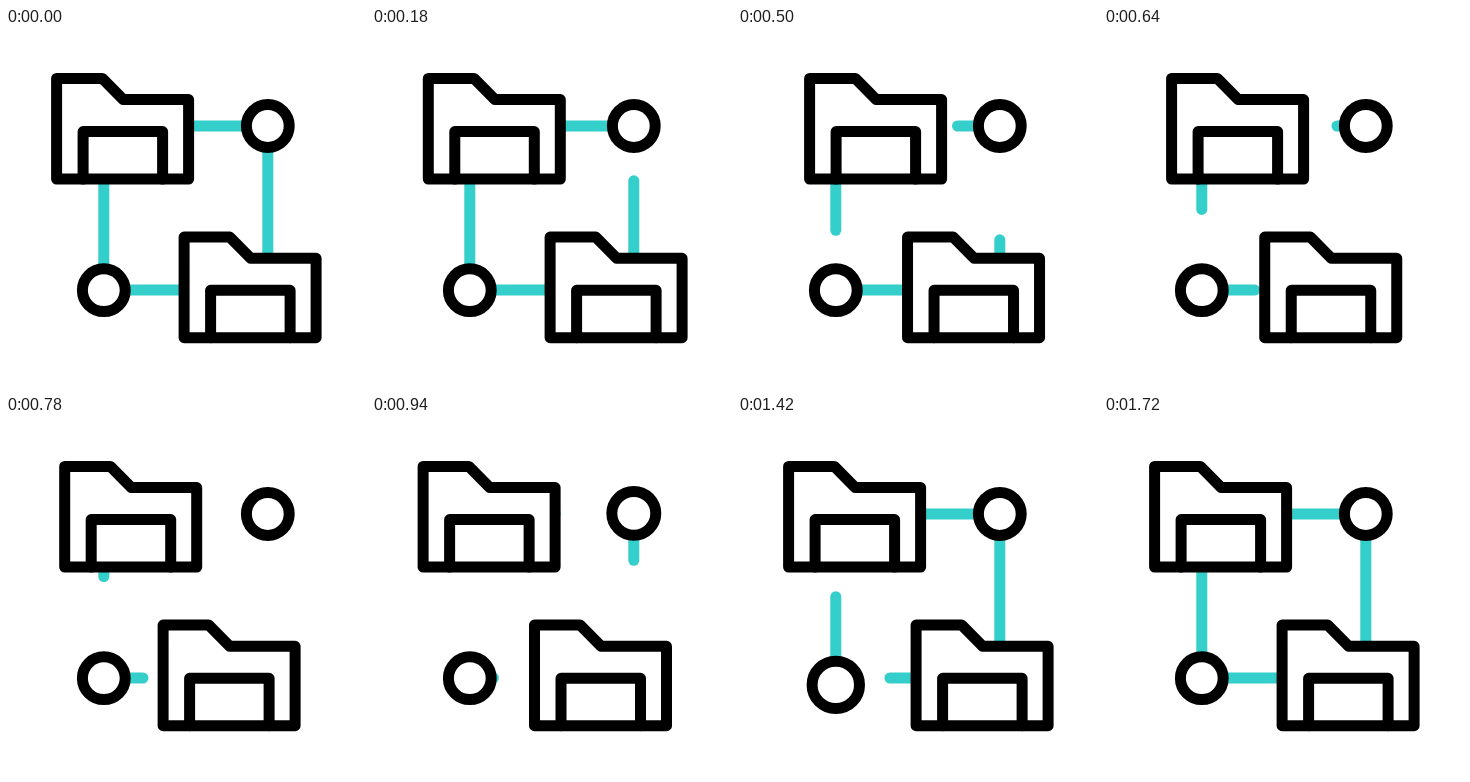
Write an HTML page that moves like this. It is 360x360 px and loops after 1.8 s.

```html
<!DOCTYPE html>
<html lang="en">
<head>
<meta charset="utf-8">
<title>Linked folders</title>
<style>
  html, body { margin: 0; width: 100%; height: 100%; overflow: hidden; background: #fff; }
  svg { display: block; width: 100vw; height: 100vh; }
  .shape { fill: #fff; stroke: #000; stroke-width: 11; stroke-linejoin: round; stroke-linecap: round; }
  .link { stroke: #34cecb; stroke-width: 11; stroke-linecap: round; }
</style>
</head>
<body>
<svg viewBox="0 0 360 360">
  <defs>
    <g id="folder" class="shape">
      <path d="M50.6 50.4H96.3L117.3 71.6H182.6V151H50.6Z"/>
      <path d="M77.1 151V103.6H156.6V151" fill="none"/>
    </g>
  </defs>
  <g id="links"></g>
  <use id="upper" href="#folder"/>
  <use id="lower" href="#folder"/>
  <circle id="right" class="shape" cx="261.8"/>
  <circle id="left" class="shape" cx="97.8"/>
</svg>
<script>
  const LOOP = 1800, ERASE = 600, DRAW = 540;
  const SWAY = 980, SHIFT = 21, RADIUS = 21.4;
  const byId = id => document.getElementById(id);
  const clamp = v => Math.min(1, Math.max(0, v));

  // Each link vanishes from its start point, then grows from it again.
  const links = [
    { from: [261.8, 119.5], to: [261.8, 230], erase: 0, draw: 820 },
    { from: [183, 98], to: [240.5, 98], erase: 120, draw: 940 },
    { from: [97.8, 240.5], to: [97.8, 151], erase: 245, draw: 1060 },
    { from: [178, 262], to: [119.5, 262], erase: 360, draw: 1180 }
  ];
  const folders = [
    { el: byId('upper'), x: 0, y: 0, dir: 1, start: 10 },
    { el: byId('lower'), x: 127.5, y: 158.7, dir: -1, start: 285 }
  ];
  const rings = [
    { el: byId('right'), y: 98, lift: -2.7, start: 860, span: 500 },
    { el: byId('left'), y: 262.2, lift: 7, start: 1070, span: 620 }
  ];

  for (const link of links) {
    link.el = document.createElementNS('http://www.w3.org/2000/svg', 'line');
    link.el.setAttribute('class', 'link');
    byId('links').append(link.el);
  }

  // Smooth rise to 1 and back to 0 over the span.
  const swell = (t, start, span) =>
    (1 - Math.cos(2 * Math.PI * clamp((t - start) / span))) / 2;

  function setAttrs(el, attrs) {
    for (const name in attrs) el.setAttribute(name, attrs[name]);
  }

  function drawLink({ el, from, to, erase, draw }, t) {
    const growing = t >= draw;
    const p = clamp(growing ? (t - draw) / DRAW : (t - erase) / ERASE);
    const tip = from.map((v, i) => v + (to[i] - v) * p);
    const [a, b] = growing ? [from, tip] : [tip, to];
    const hidden = growing ? p === 0 : p === 1;
    setAttrs(el, {
      x1: a[0], y1: a[1], x2: b[0], y2: b[1],
      visibility: hidden ? 'hidden' : 'visible'
    });
  }

  function render(t) {
    for (const link of links) drawLink(link, t);
    for (const { el, x, y, dir, start } of folders) {
      const dx = dir * SHIFT * swell(t, start, SWAY);
      setAttrs(el, { transform: `translate(${x + dx} ${y})` });
    }
    for (const { el, y, lift, start, span } of rings) {
      const s = swell(t, start, span);
      setAttrs(el, { cy: y + lift * s, r: RADIUS + 2.4 * s });
    }
  }

  const begin = performance.now();
  function tick() {
    render((performance.now() - begin) % LOOP);
    requestAnimationFrame(tick);
  }
  tick();
</script>
</body>
</html>
```
